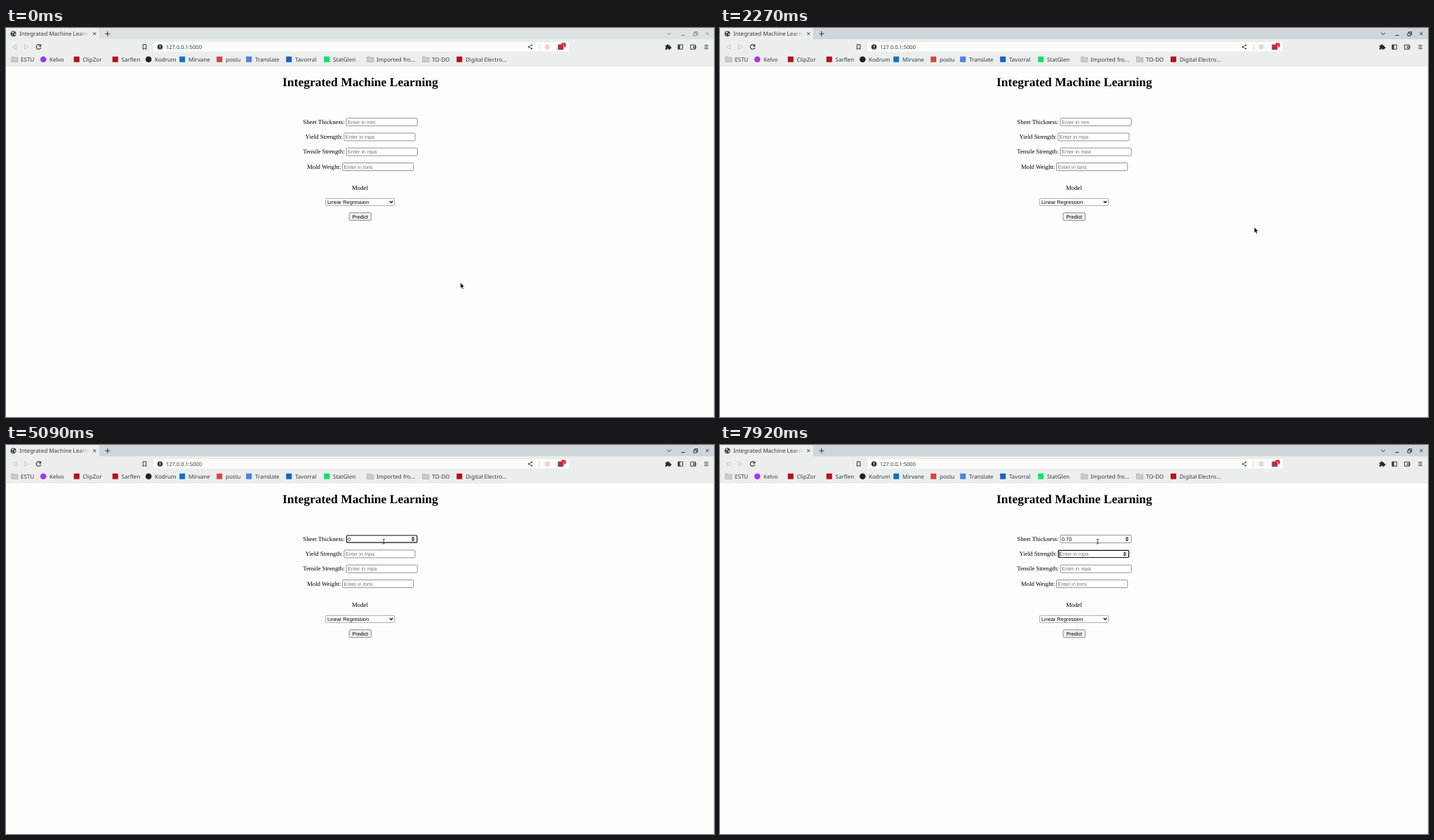
Write an HTML page that moves like this. It is 1009x555 px and loops after 8 s.

```html
<!DOCTYPE html>
<html lang="en">
<head>
<meta charset="utf-8">
<title>Integrated Machine Learning</title>
<style>
  html, body { margin: 0; width: 100%; height: 100%; overflow: hidden; background: #fdfefc; }
  svg { display: block; width: 1009px; height: 555px; text-rendering: geometricPrecision; }
  text { white-space: pre; }
  .ui { font: 8.05px "Noto Sans", "Open Sans", sans-serif; fill: #343a40; }
  .page { font: 8.75px "Liberation Serif", serif; fill: #000; }
  .field { font: 7.3px "Liberation Sans", sans-serif; fill: #000; }
</style>
</head>
<body>
<svg id="stage" viewBox="0 0 1009 555">
  <defs>
    <linearGradient id="fade" x1="0" x2="1">
      <stop offset="0" stop-color="#eaeeec" stop-opacity="0"/>
      <stop offset="1" stop-color="#eaeeec"/>
    </linearGradient>
  </defs>
</svg>
<script>
const LOOP = 8000;
const INK = '#33383c';
const stage = document.getElementById('stage');

function add(tag, attrs, parent = stage) {
  const node = document.createElementNS('http://www.w3.org/2000/svg', tag);
  for (const key in attrs) node.setAttribute(key, attrs[key]);
  return parent.appendChild(node);
}
const rect = (x, y, width, height, fill, extra = {}, parent = stage) =>
  add('rect', { x, y, width, height, fill, ...extra }, parent);
const circle = (cx, cy, r, fill) => add('circle', { cx, cy, r, fill });
const path = (d, extra = {}, parent = stage) => add('path', { d, ...extra }, parent);
const line = (d, stroke = INK, width = 1) => path(d, { fill: 'none', stroke, 'stroke-width': width });
function text(x, y, string, cls, style = '', parent = stage) {
  const node = add('text', { x, y, class: cls, style }, parent);
  node.textContent = string;
  return node;
}
const show = (node, on) => node.setAttribute('visibility', on ? 'visible' : 'hidden');

// Window frame and tab
const strip = rect(0, 0, 1009, 17, '#dce2e2');
path('M0 0H130Q133 0 133 3V16H0Z', { fill: '#eaeeec' });
rect(0, 16, 1009, 38.5, '#eaeeec');
rect(0, 54, 1009, 0.7, '#d9dedc');
circle(10.5, 8.2, 3.9, '#343a40');
path('M8 6.5l2-1.6 1.2 1-1 1.5-1 .4zM11.5 8l1.9-.6.2 2-1.5 1.3zM8 9l1.6.8.2 1.5-1-.4z', { fill: '#eaeeec' });
text(19, 11, 'Integrated Machine Learn', 'ui');
rect(103, 2, 16, 12, 'url(#fade)');
line('M124.2 6.2l4 4m0-4l-4 4');
line('M141.2 8.2h7M144.7 4.7v7', INK, 1.1);
const controls = line('M942.2 6.8l2.8 2.8 2.8-2.8M962.5 10.5h5M980 7.3h4.2v3.8h-4.2zM981.4 7V5.6h4.2v4h-1.3M997.3 6l4.2 4.2m0-4.2l-4.2 4.2');

// Toolbar
line('M14.6 23.9L9 27l5.6 3.1z', '#c3c9c8', 0.9);
line('M26.4 23.9L32 27l-5.6 3.1z', '#c3c9c8', 0.9);
line('M49.3 25.2A3.3 3.3 0 1 0 49.6 28', INK, 1.2);
path('M50.2 22.9v3.6h-3.6z', { fill: INK });
line('M195.2 23.7h4.6v6.8l-2.3-1.6-2.3 1.6z');
rect(210, 20, 592, 13.6, '#fcfdfb', { rx: 2 });
circle(219.5, 27, 3.8, '#343a40');
rect(219, 24.6, 1, 2.8, '#fff');
rect(219, 28.2, 1, 1, '#fff');
text(228, 29.8, '127.0.0.1:5000', 'ui', 'font-size:7.5px');
line('M749.2 24.5l-4.2 2.5 4.2 2.5', INK, 0.8);
for (const [x, y] of [[749.2, 24.5], [745, 27], [749.2, 29.5]]) circle(x, y, 1.1, INK);
rect(760, 23, 0.8, 8, '#cdd1d0');
circle(771.5, 27, 3.8, '#eed6cb');
rect(786.5, 23.5, 8, 7.5, '#a5305f');
rect(791.5, 21.3, 6.3, 6.3, '#e5222f', { rx: 1.6 });
text(793.4, 26.5, '1', 'field', 'font-size:5px;fill:#fff');
path('M939.7 24.8h2.1a1.3 1.3 0 1 1 2.5 0h2.2v2.1a1.3 1.3 0 1 1 0 2.4v1.4h-2.2a1.2 1.2 0 0 0-2.4 0h-2.2v-2.2a1.2 1.2 0 0 0 0-2.3z', { fill: '#25292c' });
line('M957.8 24h6.6v6.2h-6.6z');
rect(958, 24, 2.5, 6.2, INK);
line('M975.6 24.2h7v6h-7zM979.6 26.2h3.4v2.2h-3.4z');
line('M995.4 24.6h5.2M995.4 27h5.2M995.4 29.4h5.2');

// Bookmarks: label, text x, icon kind, icon colour
const bookmarks = [
  ['ESTU', 21, 'folder'],
  ['Kelvo', 62, 'disc', '#a435f0'],
  ['ClipZor', 109.5, 'box', '#b5101c'],
  ['Sarflen', 164.5, 'box', '#b5101c'],
  ['Kodrum', 212, 'disc', '#1d2126'],
  ['Mirvane', 260, 'box', '#1272c4'],
  ['postu', 313, 'box', '#d5453b'],
  ['Translate', 355, 'box', '#4a80e0'],
  ['Tavorral', 412, 'box', '#1c5fc0'],
  ['StatGlen', 466, 'box', '#06e45f'],
  ['Imported fro…', 528, 'folder'],
  ['TO-DO', 607, 'folder'],
  ['Digital Electro…', 655, 'box', '#b5101c']
];
for (const [label, x, kind, color] of bookmarks) {
  const cx = x - 8.8;
  if (kind === 'disc') circle(cx, 44.7, 4.3, color);
  else if (kind === 'box') rect(cx - 4, 40.7, 8, 8, color);
  else path(`M${cx - 4.7} 41h3.6l1 1.1h4.8v6.4h-9.4z`, { fill: '#c9cdca', stroke: '#a4a9a6', 'stroke-width': 0.6 });
  text(x, 47.6, label, 'ui');
}

// Page
rect(0, 54.7, 1008, 501, '#fdfefc');
rect(1008, 54.7, 1, 501, '#eceeea');
text(394, 82.8, 'Integrated Machine Learning', 'page', 'font-size:17.53px;font-weight:bold');

const fields = [
  ['Sheet Thickness:', 423.3, 485, 128.6, 'Enter in mm'],
  ['Yield Strength:', 426.5, 481.8, 149.9, 'Enter in mpa'],
  ['Tensile Strength:', 423.2, 485, 171.2, 'Enter in mpa'],
  ['Mold Weight:', 429, 479.6, 192.5, 'Enter in tons']
].map(([label, labelX, x, y, hint]) => {
  const width = 101.2, height = 11;
  text(labelX, y + 8, label, 'page');
  const box = rect(x, y, width, height, '#fff', { rx: 1.4 });
  const value = text(x + 2, y + 8.2, hint, 'field');
  const spinner = add('g');
  rect(x + 92.2, y + 1.6, 6, 7.8, '#ececec', {}, spinner);
  path(`M${x + 92.8} ${y + 4.9}l2.2-2.4 2.2 2.4zM${x + 92.8} ${y + 6.2}l2.2 2.4 2.2-2.4z`, { fill: '#222' }, spinner);
  const caret = rect(0, y + 1.9, 0.7, 7.4, '#000');
  return { x, y, width, height, hint, box, value, spinner, caret };
});

function outline({ x, y, width, height, box }, active) {
  const inset = active ? 0.4 : 0;
  const attrs = {
    x: x + inset, y: y + inset, width: width - 2 * inset, height: height - 2 * inset,
    stroke: active ? '#101010' : '#767676', 'stroke-width': active ? 1.2 : 0.8
  };
  for (const key in attrs) box.setAttribute(key, attrs[key]);
}

text(493, 231.2, 'Model', 'page');
rect(455.7, 243.3, 97.8, 10, '#fff', { rx: 1, stroke: '#858585', 'stroke-width': 0.7 });
text(458, 250.8, 'Linear Regression', 'field');
line('M546.8 246.9l2.2 2.3 2.2-2.3', '#111', 1.4);
rect(489, 263.6, 31.4, 10.9, '#efefef', { rx: 1.4, stroke: '#767676', 'stroke-width': 0.8 });
text(493.4, 271.7, 'Predict', 'field');

const arrow = path('M0 0V8.4L1.9 6.7 3.2 9.7 4.7 9 3.4 6.1H6Z', { fill: '#111', stroke: '#fff', 'stroke-width': 0.6 });
const beam = line('M-1.8-3.2H-.5L0-2.8.5-3.2H1.8M0-2.8V2.8M-1.8 3.2H-.5L0 2.8.5 3.2H1.8', '#222', 0.8);

// Motion
const clamp = u => Math.max(0, Math.min(1, u));
const progress = (t, from, to) => clamp((t - from) / (to - from));
const easeOut = u => 1 - (1 - u) ** 2.55;
const easeInOut = u => u * u * (3 - 2 * u);
const moves = [
  [730, 1290, 761.3, 284, easeOut],
  [2520, 2840, 587, 171.5, easeInOut],
  [3040, 3700, 540, 138, easeInOut],
  [3760, 3840, 538.3, 137.7, easeInOut]
];
function pointerAt(t) {
  let x = 647.5, y = 363;
  for (const [from, to, toX, toY, ease] of moves) {
    const u = ease(progress(t, from, to));
    x += (toX - x) * u;
    y += (toY - y) * u;
  }
  return { x, y };
}

const CLICK = 3880, TAB = 7800;
const typed = [[4800, '0'], [5400, '.'], [6500, '7'], [7150, '0']];
const caretOn = [[CLICK, 4310], [4780, 5060], [5400, 6100], [6500, 6970], [7150, 7560], [TAB, LOOP]];

const mix = (a, b, u) => `rgb(${a.map((v, i) => Math.round(v + (b[i] - v) * u))})`;

function render(t) {
  const focusFade = progress(t, 1800, 2100);
  strip.setAttribute('fill', mix([220, 226, 226], [207, 214, 217], focusFade));
  controls.setAttribute('stroke', mix([132, 138, 140], [40, 45, 49], focusFade));

  const { x, y } = pointerAt(t);
  const entry = typed.filter(([at]) => t >= at).map(([, key]) => key).join('');
  const focused = t < CLICK ? -1 : t < TAB ? 0 : 1;
  const blink = caretOn.some(([from, to]) => t >= from && t < to);
  let overField = false;

  fields.forEach((f, i) => {
    const hover = x > f.x && x < f.x + f.width && y > f.y && y < f.y + f.height;
    const active = i === focused;
    const content = i === 0 ? entry : '';
    overField = overField || hover;
    outline(f, active);
    f.value.textContent = content || f.hint;
    f.value.style.fill = content ? '#000' : '#757575';
    show(f.spinner, hover || active);
    f.caret.setAttribute('x', f.x + 2 + (content ? f.value.getComputedTextLength() : 0));
    show(f.caret, active && blink);
  });

  const place = `translate(${x} ${y})`;
  arrow.setAttribute('transform', place);
  beam.setAttribute('transform', place);
  show(arrow, !overField);
  show(beam, overField);
}

let start;
function tick(now) {
  start ??= now;
  render((now - start) % LOOP);
  requestAnimationFrame(tick);
}
render(0);
requestAnimationFrame(tick);
</script>
</body>
</html>
```
